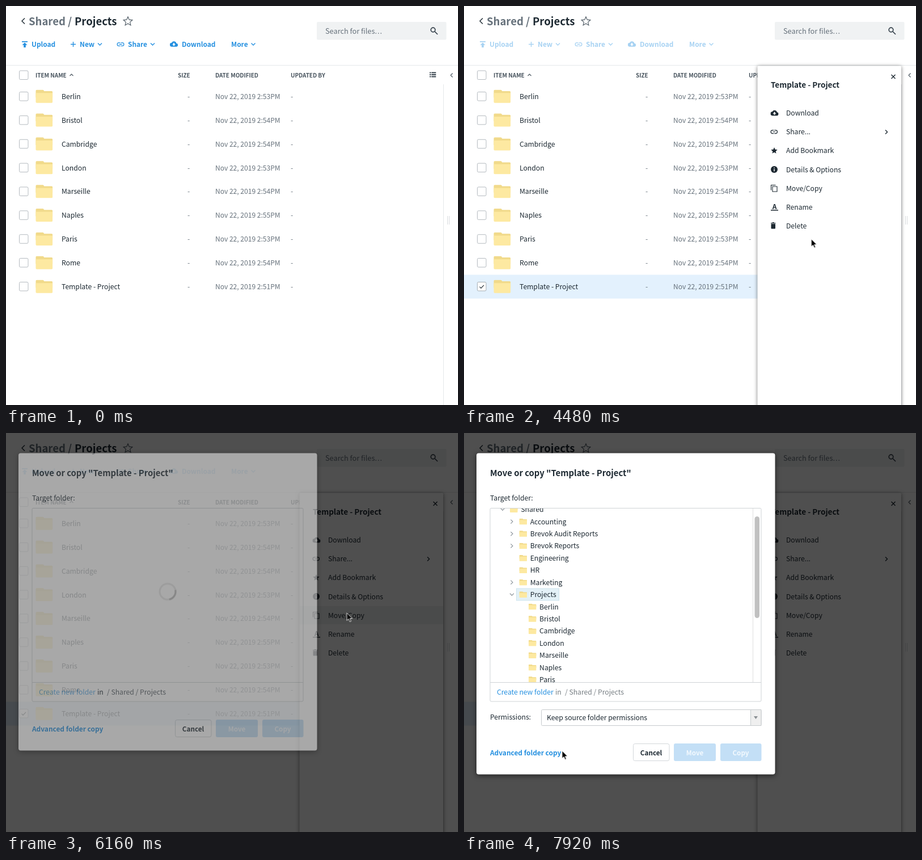
Write an HTML page that moves like this. It is 797 px wide and 703 px high and loops after 8000 ms.

```html
<!DOCTYPE html>
<html lang="en">
<head>
<meta charset="utf-8">
<title>Move or copy a folder</title>
<style>
html, body { margin: 0; width: 100%; height: 100%; overflow: hidden; background: #fff; }
svg { display: block; }
text { font: 12.17px "Noto Sans CJK JP", "Noto Sans CJK SC", "Noto Sans CJK", "Open Sans", sans-serif; fill: #1c2831; white-space: pre; }
.b { font-weight: 700; font-size: 11.9px; }
.h { font-weight: 700; font-size: 9.95px; fill: #46525c; }
.title { font-weight: 700; font-size: 18.5px; }
.g { fill: #66717b; }
.date { font-size: 12.05px; fill: #66717b; }
.blue { fill: #2590e0; }
.mid { text-anchor: middle; }
.btn { font-size: 11.7px; }
.line, .thin { fill: none; stroke: currentColor; stroke-width: 1.4; }
.thin { stroke-width: 1.1; }
.box { fill: #fff; stroke: #b4babf; }

.step, #lower, #modalBox { animation: 8s step-end infinite; }
#bar { animation-name: bar; }
#rowBg { animation-name: rowBg; }
.picked { animation-name: picked; }
#tick { animation-name: tick; }
#panel { animation-name: panel; }
#hover { animation-name: hover; }
#loading { animation-name: loading; }
#loaded { animation-name: loaded; }
#lower { animation-name: lower; }
#modalBox { animation-name: grow; }
#shade { animation: shade 8s linear infinite; }
#modal { animation: modal 8s linear infinite; }
#spin { animation: spin 8s linear infinite; }
#cx { animation: cx 8s infinite; }
#cy { animation: cy 8s infinite; }

@keyframes bar { 0% { opacity: 1 } 37%, 100% { opacity: .4 } }
@keyframes rowBg { 0% { fill: #fff0 } 37% { fill: #dee8f5 } 51%, 100% { fill: #e3f1fd } }
@keyframes picked { 0% { stroke: #b4babf } 34% { stroke: #2c8fda } 51%, 100% { stroke: #a5adb3 } }
@keyframes tick { 0% { opacity: 0 } 34%, 100% { opacity: 1 } }
@keyframes panel { 0% { opacity: 0 } 37%, 100% { opacity: 1 } }
@keyframes hover { 0% { opacity: 0 } 61% { opacity: 1 } 85%, 100% { opacity: 0 } }
@keyframes loading { 0% { opacity: 1 } 86%, 100% { opacity: 0 } }
@keyframes loaded { 0% { opacity: 0 } 86%, 100% { opacity: 1 } }
@keyframes lower { 0% { transform: translateY(0) } 86%, 100% { transform: translateY(42px) } }
@keyframes grow { 0% { height: 524px } 86%, 100% { height: 566px } }
@keyframes shade { 0%, 73% { opacity: 0 } 75% { opacity: .63 } 77%, 100% { opacity: .69 } }
@keyframes modal { 0%, 76% { opacity: 0 } 78%, 100% { opacity: 1 } }
@keyframes spin { to { transform: rotate(2880deg) } }
@keyframes cx {
  0%, 5% { transform: translateX(460px); animation-timing-function: cubic-bezier(.35, .1, .6, .9) }
  15% { transform: translateX(42px); animation-timing-function: ease-out }
  23%, 28% { transform: translateX(30px) }
  34%, 41% { transform: translateX(31px); animation-timing-function: cubic-bezier(.5, 0, .7, .7) }
  51% { transform: translateX(509px); animation-timing-function: cubic-bezier(.2, .6, .5, 1) }
  58.5% { transform: translateX(620px); animation-timing-function: ease-in-out }
  63%, 84.5% { transform: translateX(601px); animation-timing-function: cubic-bezier(.45, 0, .75, .75) }
  94% { transform: translateX(274px); animation-timing-function: cubic-bezier(.2, .4, .5, 1) }
  99%, 100% { transform: translateX(173px) }
}
@keyframes cy {
  0%, 4.9% { transform: translateY(725px) }
  5% { transform: translateY(698px); animation-timing-function: cubic-bezier(.35, .1, .6, .9) }
  15% { transform: translateY(558px); animation-timing-function: ease-out }
  23%, 41% { transform: translateY(498px); animation-timing-function: linear }
  51% { transform: translateY(499px); animation-timing-function: cubic-bezier(.4, 0, .4, 1) }
  63%, 84.5% { transform: translateY(317px); animation-timing-function: cubic-bezier(.45, 0, .75, .75) }
  94% { transform: translateY(484px); animation-timing-function: cubic-bezier(.2, .4, .5, 1) }
  99%, 100% { transform: translateY(560px) }
}
</style>
</head>
<body>
<svg width="797" height="703" viewBox="0 0 797 703">
  <defs>
    <symbol id="folder" viewBox="0 0 30 24">
      <path fill="#f1da8b" d="M0 2.5Q0 .5 2 .5h10.500q1.200 0 1.700 1l.8 1.300h13q2 0 2 2V14H0z"/>
      <path fill="#fde9a1" d="M0 6h30v15.500q0 2-2 2H2q-2 0-2-2z"/>
    </symbol>
    <symbol id="cloud" viewBox="0 0 24 24">
      <path fill="currentColor" fill-rule="evenodd" d="M19.400 10A7.500 7.500 0 0 0 5.400 8 6 6 0 0 0 6 20h13a5 5 0 0 0 .4-10zM17 13l-5 5-5-5h3V9h4v4z"/>
    </symbol>
    <symbol id="link" viewBox="0 0 24 24">
      <path fill="none" stroke="currentColor" stroke-width="2.200" d="M11 7H7a5 5 0 0 0 0 10h4M13 7h4a5 5 0 0 1 0 10h-4M8 12h8"/>
    </symbol>
    <symbol id="star" viewBox="0 0 24 24">
      <path d="M12 2l3 6.900 7.500.7-5.700 5 1.700 7.300L12 18l-6.500 3.900 1.700-7.300-5.700-5 7.500-.7z"/>
    </symbol>
    <clipPath id="treeClip"><rect x="47" y="133" width="476" height="306"/></clipPath>
  </defs>

  <g color="#1c2831">
    <path class="line" d="M33 21.500l-5 5 5 5"/>
    <text class="title g" x="40" y="33.500">Shared /</text>
    <text class="title" x="121" y="33.500">Projects</text>
    <use href="#star" x="206" y="17.500" width="18" height="18" fill="none" stroke="#4d5963" stroke-width="1.500"/>
    <rect x="548" y="28" width="228.500" height="31.500" rx="2" fill="#f0f2f3"/>
    <text class="g" x="563" y="48.700" style="font-size:12.75px">Search for files<tspan letter-spacing="1">...</tspan></text>
    <g fill="none" stroke="#36424c" stroke-width="1.700"><circle cx="753" cy="42" r="3.800"/><path d="M756 45l5 5"/></g>
  </g>

  <g id="bar" class="step" color="#2590e0">
    <path fill="currentColor" d="M28 62h10v1.800H28zM33 64.500l4.500 4.300h-2.700V73h-3.600v-4.200h-2.700z"/>
    <path class="line" d="M114 67.500h9M118.500 63v9M162 65.500l3.500 3.500 3.500-3.500M255 65.500l3.500 3.500 3.500-3.500M432.500 65.500l3.500 3.500 3.500-3.500"/>
    <use href="#link" x="195" y="60.500" width="14" height="14"/>
    <use href="#cloud" x="289" y="60" width="14" height="14"/>
    <text class="b blue" x="45" y="72">Upload</text>
    <text class="b blue" x="130" y="72">New</text>
    <text class="b blue" x="215" y="72">Share</text>
    <text class="b blue" x="310" y="72">Download</text>
    <text class="b blue" x="397" y="72">More</text>
  </g>

  <g color="#46525c">
    <path stroke="#e5e8ea" d="M0 104.500h797M771.500 138v565"/>
    <rect class="box" x="23.500" y="114" width="15.500" height="15.500" rx="2"/>
    <text class="h" x="52" y="125.500">ITEM NAME</text>
    <text class="h" x="303" y="125.500">SIZE</text>
    <text class="h" x="369" y="125.500">DATE MODIFIED</text>
    <text class="h" x="502" y="125.500">UPDATED BY</text>
    <path class="thin" d="M112.500 123l3-3 3 3M787.500 118.500l-3.500 3.500 3.500 3.500"/>
    <path stroke="#36424c" stroke-width="2.200" d="M747 117.500h2.200m1 0h8M747 121h2.200m1 0h8M747 124.500h2.200m1 0h8"/>
    <path stroke="#d9dcdf" d="M778.500 370v15M781.500 370v15"/>
  </g>
  <rect id="rowBg" class="step" y="473.500" width="771" height="42"/>
  <g id="rows"></g>
  <path id="tick" class="step thin" color="#1c2831" d="M27.500 494.700l2.500 2.500 5-5.400"/>

  <g id="panel" class="step" color="#1c2831">
    <rect x="517.500" y="105.500" width="253.500" height="620" rx="2" fill="#fff" style="filter:drop-shadow(0 1px 3px #0008)"/>
    <rect id="hover" class="step" x="518" y="305" width="253" height="32" fill="#f1f2f3"/>
    <text class="b" x="541" y="144" style="font-size:13.5px">Template - Project</text>
    <path class="line" d="M753.500 121l7 7m0-7l-7 7M743 218.500l3.500 3.500-3.500 3.500"/>
    <g id="menu"></g>
    <use href="#cloud" x="540.500" y="181.500" width="14" height="14"/>
    <use href="#link" x="540" y="215" width="13.500" height="13.500"/>
    <use href="#star" x="540.500" y="248" width="13" height="13" fill="currentColor"/>
    <circle cx="547" cy="288" r="6" fill="currentColor"/>
    <path stroke="#fff" stroke-width="1.500" d="M547 284.500v1.500m0 1.200v4"/>
    <path class="thin" d="M549.500 315.500h-8v9M544 318h8v9h-8z"/>
    <text class="b mid" x="547.500" y="357.500">A</text>
    <path fill="currentColor" d="M541 359h13v1.500h-13zM541 382h2.500l.7-.9h2l.7.9h2.500v1.300H541zM541.500 384h7.500v7.500q0 1-1 1h-5.500q-1 0-1-1z"/>
  </g>

  <rect id="shade" width="797" height="703"/>

  <g id="modal">
    <rect id="modalBox" x="22" y="35.500" width="526.500" height="524" rx="4" fill="#fff" style="filter:drop-shadow(0 2px 5px #0009)"/>
    <text class="b" x="46" y="76" style="font-size:14.8px">Move or copy "Template - Project"</text>
    <text x="46" y="118.500">Target folder:</text>
    <g id="loading" class="step">
      <g transform="translate(285 279.500)" fill="none" stroke-width="3">
        <circle r="14" stroke="#e8e8e8"/>
        <g id="spin"><circle r="14" stroke="#bcbcbc" stroke-dasharray="22 66" transform="rotate(-70)"/></g>
      </g>
      <text class="blue" x="58" y="461" opacity=".75">Create new folder</text>
      <text x="161" y="461">in</text>
      <text x="178" y="461" fill-opacity=".75">/ Shared / Projects</text>
    </g>
    <g id="loaded" class="step">
      <g id="tree" clip-path="url(#treeClip)" color="#848d94">
        <rect x="92.500" y="274" width="75" height="21" fill="#e3f1f7" stroke="#cde3ed"/>
        <path stroke="#e0e0e0" d="M509.500 132v307"/>
        <rect x="512.500" y="147" width="8.500" height="179" rx="4.200" fill="#c1c1c1"/>
      </g>
      <text class="blue" x="58" y="461">Create new folder</text>
      <text x="161" y="461" fill-opacity=".6">in</text>
      <text x="178" y="461" fill-opacity=".6">/ Shared / Projects</text>
      <text x="46" y="505">Permissions:</text>
      <rect x="136.500" y="487.500" width="387.500" height="28" rx="2" fill="#fff" stroke="#c6cacd"/>
      <path fill="#efefef" stroke="#c6cacd" d="M505.500 487.500h18.500v28h-18.500z"/>
      <path fill="#8a8f93" d="M511 499h7l-3.500 5z"/>
      <text x="146" y="505.500">Keep source folder permissions</text>
    </g>
    <rect x="46" y="132.500" width="478" height="340.500" rx="2" fill="none" stroke="#cfd3d6"/>
    <path stroke="#cfd3d6" d="M46 439.500h478"/>
    <g id="lower">
      <text class="b blue" x="46" y="525.500">Advanced folder copy</text>
      <rect x="298.500" y="505.500" width="63.500" height="30" rx="3" fill="#fff" stroke="#d3d7da"/>
      <rect x="370" y="505" width="74" height="31" rx="3" fill="#c3dff6"/>
      <rect x="452" y="505" width="72.500" height="31" rx="3" fill="#c3dff6"/>
      <text class="b mid btn" x="330" y="525.500">Cancel</text>
      <text class="b mid btn" x="407" y="525.500" style="fill:#f3f9fe">Move</text>
      <text class="b mid btn" x="488" y="525.500" style="fill:#f3f9fe">Copy</text>
    </g>
  </g>

  <g id="cx"><g id="cy">
    <path fill="#000" stroke="#fff" stroke-width="1" transform="scale(.9)" d="M0 0v14.800l3.400-3.200 2.400 5.600 2.500-1.100-2.400-5.300h4.700z"/>
  </g></g>
</svg>
<script>
const add = (id, html) => document.getElementById(id).insertAdjacentHTML('beforeend', html);
const text = (x, y, str, cls = '') => `<text class="${cls}" x="${x}" y="${y}">${str}</text>`;
const folder = (x, y, w, h) => `<use href="#folder" x="${x}" y="${y}" width="${w}" height="${h}"/>`;

const cities = ['Berlin', 'Bristol', 'Cambridge', 'London', 'Marseille', 'Naples', 'Paris', 'Rome'];
const minutes = [53, 54, 54, 53, 54, 55, 53, 54, 51];

[...cities, 'Template - Project'].forEach((name, i) => {
  const y = 159.5 + i * 41.87;
  const picked = i === cities.length ? ' step picked' : '';
  add('rows',
    `<rect class="box${picked}" x="23.500" y="${y - 8}" width="15.500" height="15.500" rx="2"/>` +
    folder(52.3, y - 12.3, 30, 24) +
    text(98, y + 4.5, name) +
    text(320, y + 4.5, '-', 'g') +
    text(369, y + 4.5, `Nov 22, 2019 2:${minutes[i]}PM`, 'date') +
    text(502, y + 4.5, '-', 'g'));
});

['Download', 'Share...', 'Add Bookmark', 'Details &amp; Options', 'Move/Copy', 'Rename', 'Delete']
  .forEach((name, i) => add('menu', text(568, 193.2 + i * 33.1, name)));

// A leading ">" is a closed branch, "v" an open one
const tree = ['v0Shared', '>1Accounting', '>1Brevok Audit Reports', '>1Brevok Reports', ' 1Engineering',
  ' 1HR', '>1Marketing', 'v1Projects', ...cities.map(city => ' 2' + city)];
const arrows = { '>': 'm-2-3.500l3.500 3.500-3.500 3.500', 'v': 'm-3.500-2l3.500 3.500 3.500-3.500' };

tree.forEach((item, i) => {
  const x = 81 + item[1] * 16.4, y = 134.7 + i * 21.42;
  const arrow = arrows[item[0]];
  add('tree',
    (arrow ? `<path class="thin" d="M${x - 13} ${y}${arrow}"/>` : '') +
    folder(x, y - 5.5, 13.75, 11) +
    text(x + 19.3, y + 4.5, item.slice(2)));
});
</script>
</body>
</html>
```
